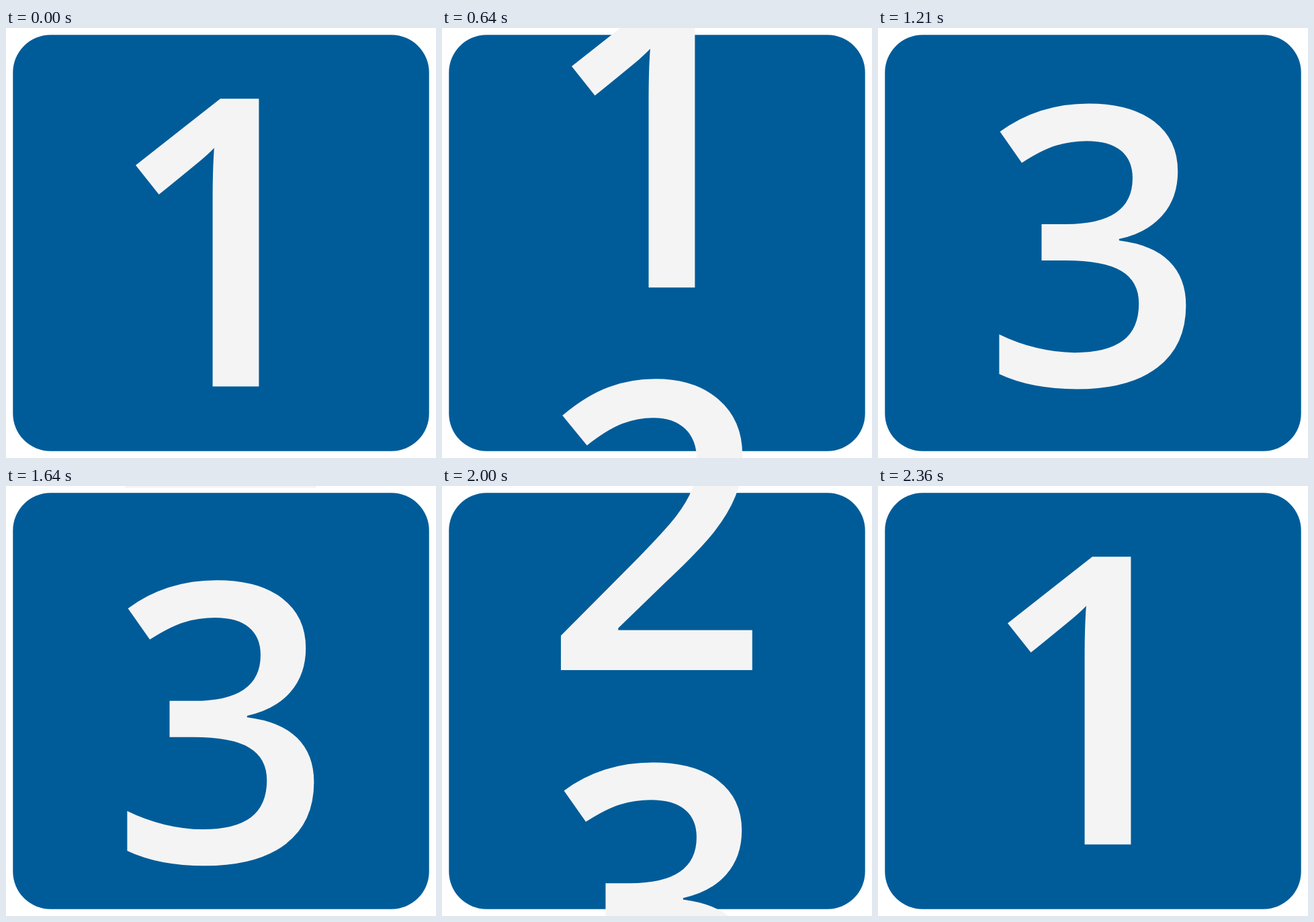
An HTML page for the animation above (2.43 s loop, 640 by 640 pixels).

```html
<!DOCTYPE html>
<html lang="en">
<head>
<meta charset="utf-8">
<title>1 2 3</title>
<style>
  html, body { margin: 0; width: 100%; height: 100%; overflow: hidden; background: #fff; }
  svg { display: block; width: 100%; height: 100%; }
  text {
    font-family: "Open Sans", "Noto Sans", sans-serif;
    font-weight: 600;
    fill: #f4f4f4;
    text-rendering: geometricPrecision;
  }
  /* One second per drawn step; the script moves the delay. */
  #strip {
    animation: scroll 34s infinite paused;
    animation-timing-function: cubic-bezier(.962, 0, .673, 1);
  }
  @keyframes scroll {
    0%, 4.41176%      { transform: translateY(0); }
    50%, 58.382%      { transform: translateY(-1121.1px); }
    97.05882%, 100%   { transform: translateY(0); }
  }
</style>
</head>
<body>
<svg viewBox="0 0 640 640">
  <rect x="10.3" y="10.3" width="619.4" height="619.4" rx="56" fill="#005c99"/>
  <g id="strip">
    <text x="147.9" y="533.5" font-size="600">1</text>
    <text x="151.1" y="1095.9" font-size="588.6">2</text>
    <text x="156.1" y="1652.9" font-size="579.1">3</text>
  </g>
</svg>
<script>
  const LOOP = 2430, STEPS = 34, STEP = 1000 / 14;
  const strip = document.getElementById('strip');
  const start = performance.now();

  function draw() {
    const t = (performance.now() - start) % LOOP;
    // Step changes fall on whole hundredths of a second
    const step = Math.floor((t + 5) / STEP) % STEPS;
    strip.style.animationDelay = `${-step}s`;
    requestAnimationFrame(draw);
  }
  draw();
</script>
</body>
</html>
```
